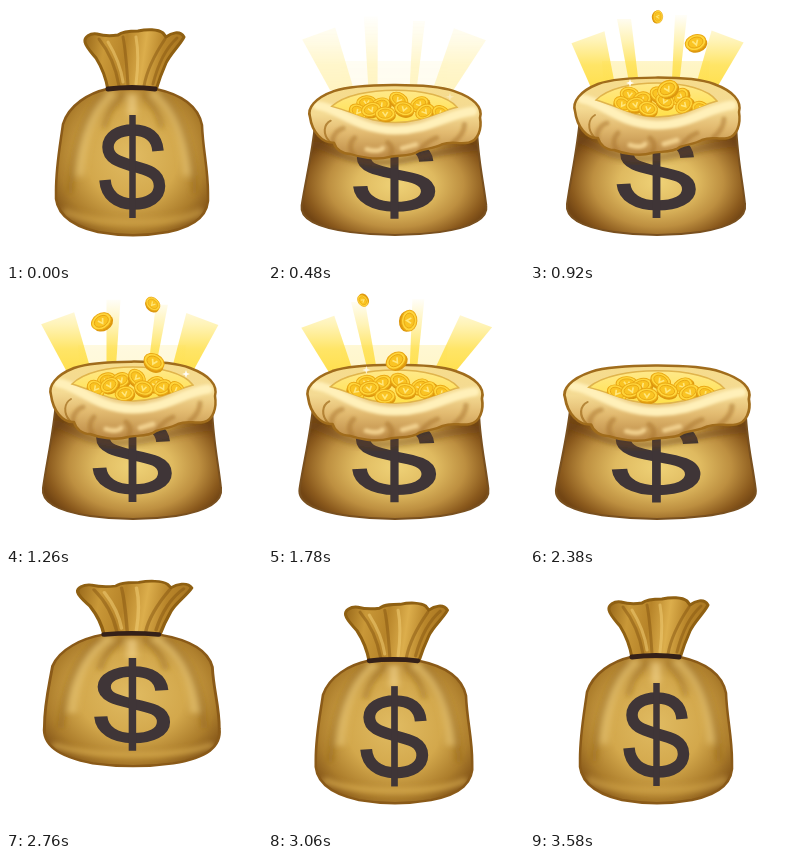
An HTML page that plays this animation: 256x256 px, repeating every 3.6 s.

```html
<!DOCTYPE html>
<html lang="en">
<head>
<meta charset="utf-8">
<title>Money bag</title>
<style>
html, body { margin: 0; width: 100%; height: 100%; overflow: hidden; background: #fff; }
svg { display: block; width: 100vw; height: 100vh; }
</style>
</head>
<body>
<svg viewBox="0 0 256 256">
  <defs>
    <radialGradient id="cloth" gradientUnits="userSpaceOnUse" cx="126" cy="150" r="92">
      <stop offset="0" stop-color="#e0bb62"/><stop offset=".5" stop-color="#d3a84c"/>
      <stop offset=".8" stop-color="#ad7e2c"/><stop offset="1" stop-color="#835418"/>
    </radialGradient>
    <radialGradient id="wide" gradientUnits="userSpaceOnUse" cx="0" cy="0" r="1" gradientTransform="translate(128 176) scale(96 66)">
      <stop offset="0" stop-color="#efd277"/><stop offset=".4" stop-color="#dfba60"/>
      <stop offset=".68" stop-color="#bd8f40"/><stop offset=".9" stop-color="#8b5a1d"/>
      <stop offset="1" stop-color="#734614"/>
    </radialGradient>
    <linearGradient id="ruffle" gradientUnits="userSpaceOnUse" x1="80" y1="30" x2="176" y2="44">
      <stop offset="0" stop-color="#9c6c1c"/><stop offset=".2" stop-color="#c99838"/>
      <stop offset=".42" stop-color="#b78429"/><stop offset=".62" stop-color="#dcae4c"/>
      <stop offset=".8" stop-color="#b8852a"/><stop offset="1" stop-color="#a97620"/>
    </linearGradient>
    <linearGradient id="drape" x1="0" y1="0" x2="0" y2="1">
      <stop offset="0" stop-color="#f6dc8c"/><stop offset=".4" stop-color="#f4da93"/>
      <stop offset=".65" stop-color="#e2ba70"/><stop offset="1" stop-color="#b98743"/>
    </linearGradient>
    <linearGradient id="gold" x1="0" y1="0" x2="0" y2="1">
      <stop offset="0" stop-color="#ffe98a"/><stop offset="1" stop-color="#ffe04a"/>
    </linearGradient>
    <linearGradient id="beam" gradientUnits="userSpaceOnUse" x1="0" y1="80" x2="0" y2="10">
      <stop offset="0" stop-color="#ffe050"/><stop offset=".3" stop-color="#ffe256" stop-opacity=".9"/>
      <stop offset=".65" stop-color="#ffe560" stop-opacity=".45"/><stop offset="1" stop-color="#ffe560" stop-opacity=".05"/>
    </linearGradient>
    <filter id="soft" x="-30%" y="-30%" width="160%" height="160%"><feGaussianBlur stdDeviation="3"/></filter>
    <filter id="fine" x="-30%" y="-30%" width="160%" height="160%"><feGaussianBlur stdDeviation="1.5"/></filter>
    <path id="sack" d="M101 83C83 87 63 99 57 118C54 140 50 160 50 185C48 206 62 219 92 226C114 230 140 230 162 226C191 220 204 208 202 187C202 162 197 145 196 119C192 99 173 88 150 83Z"/>
    <path id="tub" d="M50 112C47 145 41 170 37 198C35 212 50 221 84 226C112 230 142 230 170 226C202 221 217 212 215 198C212 170 206 145 206 112Z"/>
    <path id="lip" d="M45 105C42 96 50 85 68 78C90 70 160 69 184 78C203 85 212 95 209 106C211 118 207 130 198 132C188 134 182 130 172 134C165 138 158 138 150 141C143 147 130 145 122 147C108 151 92 147 84 144C76 144 70 139 68 132C57 133 47 121 45 105Z"/>
    <path id="hole" d="M66 94C78 82 103 77 127 77C154 77 178 83 187 95C170 99 154 111 127 111C102 111 88 100 66 94Z"/>
    <clipPath id="sackClip"><use href="#sack"/></clipPath>
    <clipPath id="tubClip"><use href="#tub"/></clipPath>
    <clipPath id="lipClip"><use href="#lip"/></clipPath>
    <clipPath id="mouth"><use href="#hole"/></clipPath>
    <g id="dollar" fill="none" stroke="#3f3537">
      <path stroke-width="11.5" d="M152 145C151 131 142 124 127 124C112 124 102 131 102 141C102 153 114 156 127 160C142 164 153.5 167 153.5 180C153.5 191 143 198 127 198C111 198 100 189 99 174"/>
      <path stroke-width="6.5" d="M126.5 109V212"/>
    </g>
  </defs>

  <g id="rays" fill="url(#beam)"></g>

  <g id="closed">
    <path d="M79 36C78 31 84 27 91 28C98 30 105 30 112 29C117 25 125 25 132 25C141 23 152 23 157 27L160 31C165 27 174 24 178 31C174 39 164 48 160 57C156 66 153 74 150 84H102C100 72 95 60 90 52C85 46 80 41 79 36Z" fill="url(#ruffle)" stroke="#8f6012" stroke-width="3" stroke-linejoin="round"/>
    <g fill="none" stroke="#855711" stroke-opacity=".5" stroke-width="3" stroke-linecap="round">
      <path d="M93 33C104 47 110 62 113 80M117 31C120 46 121 64 122 80M159 33C149 48 141 63 138 80M171 32C159 43 152 58 147 78"/>
      <path d="M130 31C133 47 132 62 130 78M102 36C110 49 115 62 117 76" stroke="#f1cc74" stroke-opacity=".55"/>
    </g>
    <use href="#sack" fill="url(#cloth)"/>
    <g clip-path="url(#sackClip)" fill="none">
      <g filter="url(#soft)">
        <path d="M108 86C87 102 76 130 74 170M145 86C169 102 179 130 181 170" stroke="#e6c373" stroke-width="8" stroke-opacity=".7"/>
        <path d="M99 87C78 107 67 145 64 187M119 87C107 97 101 108 98 122M154 87C176 107 187 145 189 187M137 87C147 98 153 108 156 122" stroke="#8c5c18" stroke-width="5" stroke-opacity=".5"/>
        <path d="M126 88V110" stroke="#f1d28a" stroke-width="9" stroke-opacity=".7"/>
        <path d="M57 205C88 220 165 221 197 205" stroke="#e2b657" stroke-width="6" stroke-opacity=".6"/>
      </g>
    </g>
    <use href="#sack" fill="none" stroke="#8a5a18" stroke-width="2.5"/>
    <path d="M102 83Q126 80 149 83" fill="none" stroke="#342018" stroke-width="5" stroke-linecap="round"/>
    <use href="#dollar"/>
  </g>

  <g id="open">
    <use href="#tub" fill="url(#wide)" stroke="#79501f" stroke-width="2"/>
    <use href="#dollar" transform="translate(126.5 212) scale(1.2 .9) translate(-126.5 -212)"/>
    <g clip-path="url(#tubClip)" fill="none">
      <path filter="url(#soft)" d="M47 133C66 138 78 151 108 153C145 153 166 140 207 137" stroke="#6d4516" stroke-width="7" stroke-opacity=".5"/>
    </g>
    <use href="#lip" fill="url(#drape)"/>
    <g clip-path="url(#lipClip)" fill="none" stroke-linecap="round">
      <g filter="url(#fine)">
        <path d="M67 133C66 125 71 119 77 117M87 145C82 138 84 131 88 127M122 147C126 141 124 135 120 132M150 142C154 135 160 130 167 127M183 132C190 126 194 119 194 113" stroke="#a8742f" stroke-width="5" stroke-opacity=".5"/>
        <path d="M52 93C70 94 90 119 127 119C160 119 178 102 202 99" stroke="#fff0b9" stroke-width="9"/>
        <path d="M100 139C108 142 114 140 115 138M134 138L147 134" stroke="#f0cf8c" stroke-width="5"/>
      </g>
      <path d="M64 131C57 123 58 113 65 109" stroke="#a06c1c" stroke-width="2" stroke-opacity=".7"/>
    </g>
    <use href="#lip" fill="none" stroke="#a06c1c" stroke-width="2.5" stroke-linejoin="round"/>
    <use href="#hole" fill="url(#gold)" stroke="#e0b44c" stroke-width="1.5"/>
    <g id="heap" clip-path="url(#mouth)"></g>
    <g id="glints" fill="#fff"></g>
  </g>
  <g id="flying"></g>
</svg>
<script>
const LOOP = 3600, NS = "http://www.w3.org/2000/svg";
const $ = id => document.getElementById(id);
const clamp = v => Math.max(0, Math.min(1, v));
const mix = (a, b, u) => a + (b - a) * u;
const ease = u => u * u * (3 - 2 * u);

function add(parent, tag, attrs) {
  const el = document.createElementNS(NS, tag);
  for (const k in attrs) el.setAttribute(k, attrs[k]);
  return parent.appendChild(el);
}

// time, width scale, height scale, lift
const poses = [
  [0, 1, 1, 0], [160, 1.12, .88, 0], [310, .95, 1.075, 0], [400, 1.1, .86, 0],
  [401, .93, 1.05, 0], [490, 1.04, .95, 0], [600, .98, 1.02, 0], [700, 1, 1, 0],
  [1260, 1, 1, 0], [1780, 1.06, .98, 0], [2380, 1.12, .975, 0], [2490, 1.12, .95, 0],
  [2560, .96, 1.02, 0], [2561, .98, 1.06, 0], [2660, 1.06, .97, 28], [2720, 1.14, .91, 39],
  [2760, 1.15, .9, 37], [2900, .97, 1.04, 0], [2990, 1.12, .9, 0], [3120, .96, 1.03, 0],
  [3240, 1.02, .99, 0], [3360, .995, 1.004, 0], [3460, 1, 1, 0], [LOOP, 1, 1, 0]
];

function poseAt(t) {
  const i = Math.max(1, poses.findIndex(p => p[0] > t));
  const a = poses[i - 1], b = poses[i], u = ease((t - a[0]) / (b[0] - a[0]));
  return [1, 2, 3].map(k => mix(a[k], b[k], u));
}

function makeCoin(parent) {
  const g = add(parent, "g", {});
  add(g, "ellipse", { cx: .8, cy: 2.4, rx: 10, ry: 7.4, fill: "#dd980f" });
  add(g, "ellipse", { rx: 10, ry: 7.4, fill: "#ffd63c", stroke: "#eba914", "stroke-width": 1 });
  add(g, "ellipse", { rx: 7.2, ry: 5, fill: "#fac423", stroke: "#e6a312", "stroke-width": .8 });
  add(g, "path", { d: "M-2.6 -2L0 2.4L2.6 -2", fill: "none", stroke: "#ffe67a", "stroke-width": 1.6 });
  return g;
}

function placeCoin(g, x, y, turn, size) {
  g.setAttribute("transform", `translate(${x} ${y}) rotate(${turn}) scale(${size})`);
}

// start x, end x, launch time
const paths = [
  [128, 128, 486], [150, 179, 690], [136, 148, 870], [108, 87, 1002], [145, 160, 1174],
  [110, 95, 1346], [132, 147, 1518], [129, 124, 1690], [140, 166, 1862]
];
const coins = paths.map(() => makeCoin($("flying")));

const heap = [];
for (let row = 0; row < 2; row++)
  for (let n = 0; n < 4 + row * 2; n++)
    heap.push({
      x: 100 - row * 11 + n * 16 + 3 * Math.sin(n * 5 + row),
      y: 90 + row * 9 + 3 * Math.sin(n * 2.4 + row * 3),
      turn: 40 * Math.sin(n * 3.7 + row * 2),
      g: makeCoin($("heap"))
    });

// base x, base width, top x, top width, top y, swing, tilt
const beams = [
  [74, 24, 54, 33, 29, 4, -6], [105, 9, 100, 14, 12, -8, 0],
  [145, 7, 152, 12, 12, -4, 0], [175, 21, 199, 32, 29, 4, 6]
];
const rays = beams.map(() => add($("rays"), "path", {}));
const glow = add($("rays"), "path", { d: "M72 55H180L178 82H74Z" });
const glints = [[100, 77], [137, 74], [180, 84]].map(([x, y]) =>
  add($("glints"), "path", { d: `M${x} ${y - 4}l1 3 3 1-3 1-1 3-1-3-3-1 3-1Z` }));

function draw(t) {
  const [sx, sy, lift] = poseAt(t);
  const isOpen = t >= 401 && t < 2561;
  const frame = `translate(127 ${229 - lift}) scale(${sx} ${sy}) translate(-127 -229)`;
  $("open").style.display = isOpen ? "" : "none";
  $("closed").style.display = isOpen ? "none" : "";
  $(isOpen ? "open" : "closed").setAttribute("transform", frame);

  const shine = clamp((t - 430) / 150) * clamp((2300 - t) / 220);
  $("rays").setAttribute("opacity", shine);
  const spread = 1 + .09 * clamp((t - 1260) / 520);
  beams.forEach(([bx, bw, tx, tw, ty, swing, tilt], i) => {
    const x = 127 + (tx - 127) * spread + swing * Math.sin(t / 165 + 2.4 + i * .6);
    const y = ty + 3 * Math.sin(t / 130 + i * 2);
    rays[i].setAttribute("d", `M${bx - bw / 2} 84L${x - tw / 2} ${y - tilt}L${x + tw / 2} ${y + tilt}L${bx + bw / 2} 84Z`);
  });
  glow.setAttribute("fill-opacity", .3 + .08 * Math.cos((t - 920) / 110));
  glints.forEach((g, i) => g.setAttribute("opacity", shine * clamp(Math.sin(t / 120 + i * 2))));

  const busy = clamp((t - 450) / 100) * clamp((2350 - t) / 200);
  heap.forEach((c, i) => placeCoin(c.g,
    c.x + busy * 1.5 * Math.sin(t / 95 + i),
    c.y + busy * 2 * Math.sin(t / 80 + i * 1.7),
    c.turn + busy * 12 * Math.sin(t / 110 + i), .95));

  coins.forEach((g, i) => {
    const [from, to, start] = paths[i];
    const u = (t - start) / 430;
    const live = u > 0 && u < 1.12;
    g.style.display = live ? "" : "none";
    if (!live) return;
    const y = 100 - 152 * u + 63 * u * u;
    const size = u < .6 ? 1.05 : u < 1 ? mix(1.05, .7, (u - .6) / .4) : .7 * (1.12 - u) / .12;
    placeCoin(g, mix(from, to, u), y, 40 * Math.sin(i * 2.3) + (i % 2 ? -1 : 1) * 90 * u, size);
  });
}

function tick() {
  draw(performance.now() % LOOP);
  requestAnimationFrame(tick);
}
tick();
</script>
</body>
</html>
```
